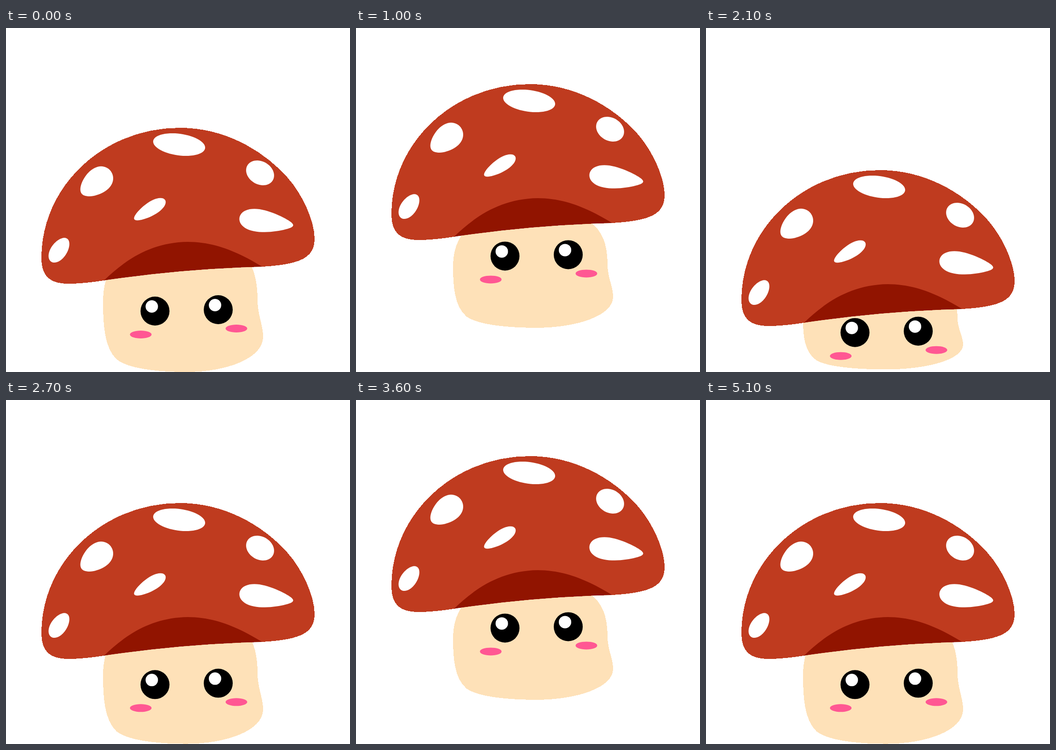
Recreate the animation shown at these times as an HTML page. Size 748x748 px, loop 5.21 s.

```html
<!DOCTYPE html>
<html lang="en">
<head>
<meta charset="utf-8">
<title>Jumping mushroom</title>
<style>
  html, body { margin: 0; width: 100%; height: 100%; overflow: hidden; background: #fff; }
  svg { display: block; width: 100%; height: 100%; }
  .crisp { shape-rendering: crispEdges; }
</style>
</head>
<body>
<svg viewBox="0 0 748 748">
  <path id="stem" class="crisp" fill="#fee1b8" d="M211 596C211 520 250 455 380 455C515 455 546 505 547 590C547 625 559 645 559 672C559 718 480 748 392 748C330 748 265 741 240 720C214 695 211 645 211 596Z"/>
  <g id="face">
    <g id="eye">
      <circle cx="324" cy="615.5" r="31.5"/>
      <circle cx="317" cy="605.5" r="13.5" fill="#fff"/>
    </g>
    <use href="#eye" x="137.5" y="-3"/>
    <ellipse id="cheek" cx="293" cy="666.5" rx="23.5" ry="8.5" fill="#ff5793"/>
    <use href="#cheek" x="208" y="-13"/>
  </g>
  <g id="cap">
    <path class="crisp" fill="#bf3b1f" d="M378 217C482 217 565 272 612 325C645 362 671 420 671 458C671 500 640 514 557 519Q390 523 218 548Q170 556 135 556C96 556 77 540 77 500C77 344 212 217 378 217Z"/>
    <path fill="#911400" d="M213 549C258 505 315 466 395 465C460 465 512 492 557 519Q390 523 218 548Z"/>
    <path id="spots" fill="#fff"/>
  </g>
</svg>
<script>
  const LOOP = 5210, STEP = 100, LAST = 51;
  const JUMP = 2600, CROUCH = 600, LEAP = 700;
  const GROUND = 748;

  const [stem, face, cap, spots] =
    ['stem', 'face', 'cap', 'spots'].map(id => document.getElementById(id));

  // Egg outline: half length, half width, axis angle in degrees, taper towards the tip.
  function egg(cx, cy, len, wide, angle, taper) {
    const a = angle * Math.PI / 180, n = 60;
    const points = Array.from({ length: n }, (_, i) => {
      const q = 2 * Math.PI * i / n;
      const x = len * Math.cos(q);
      const y = wide * Math.sin(q) * (1 - taper * Math.cos(q));
      return [cx + x * Math.cos(a) - y * Math.sin(a), cy + x * Math.sin(a) + y * Math.cos(a)];
    });
    return `M${points.join('L')}Z`;
  }

  spots.setAttribute('d',
    egg(376.5, 253.5, 57, 23.5, 8, 0) +
    egg(196, 335.5, 40, 27, 142, 0.2) +
    egg(552.5, 315, 32, 25, 30, 0) +
    egg(312.5, 395, 39.5, 14.5, 148, 0.2) +
    egg(566, 421, 59, 23, 8, 0.4) +
    egg(115.5, 483, 30.5, 17.5, -55, 0.05));

  function ease(k) {
    return (1 - Math.cos(Math.PI * Math.min(1, Math.max(0, k)))) / 2;
  }

  function move(el, y, scale = 1) {
    el.setAttribute('transform', `matrix(1 0 0 ${scale} 0 ${y + GROUND * (1 - scale)})`);
  }

  // Crouch, leap, then the same backwards.
  function draw(ms) {
    const tick = Math.min(LAST, Math.floor((ms % LOOP) / STEP));
    const t = (tick * STEP) % JUMP;
    const m = Math.min(t, JUMP - t);
    const crouch = ease(m / CROUCH), leap = ease((m - CROUCH) / LEAP);
    const between = (rest, low, high) => rest + (low - rest) * crouch + (high - low) * leap;

    move(cap, Math.round(between(0, 98.5, -218)));
    move(face, between(0, 50, -227.5));
    move(stem, between(0, -6, -153.5), between(1, 0.69, 1));
  }

  let start;
  function loop(now) {
    start ??= now;
    draw(now - start);
    requestAnimationFrame(loop);
  }
  draw(0);
  requestAnimationFrame(loop);
</script>
</body>
</html>
```
